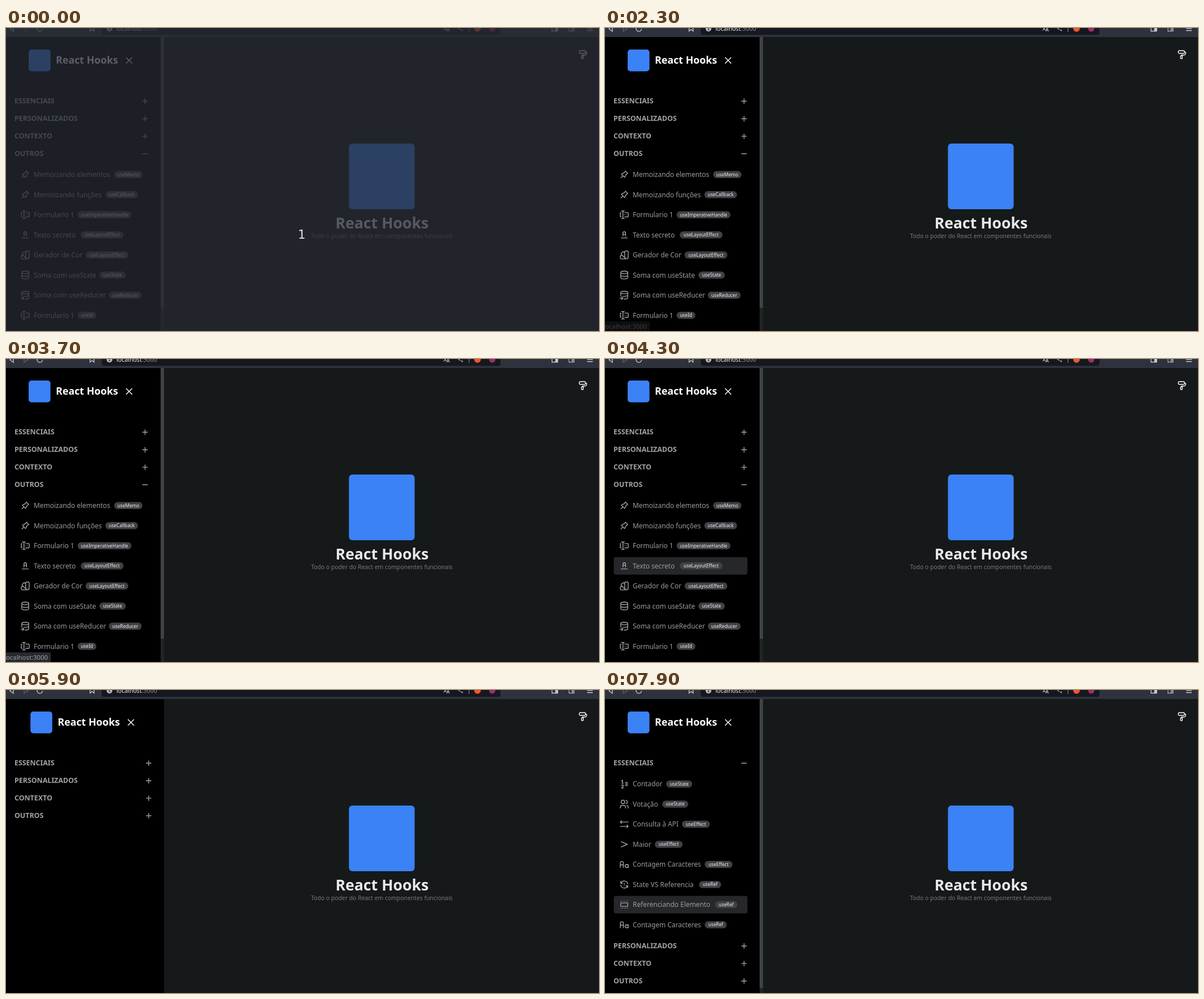
An HTML page that plays this animation: 1047 by 535 pixels, repeating every 8 s.

```html
<!DOCTYPE html>
<html lang="pt">
<head>
<meta charset="utf-8">
<title>React Hooks</title>
<style>
html, body { margin: 0; width: 100%; height: 100%; overflow: hidden; background: #151919; }
svg { display: block; width: 100%; height: 100%; }
text { font-family: "Noto Sans", "Open Sans", sans-serif; white-space: pre; }
.title { font-weight: 700; font-size: 17.8px; fill: #fff; }
.section { font-weight: 700; font-size: 12.4px; fill: #a1a3a6; }
.label { font-size: 11.9px; fill: #9a9da0; }
.tag { font-size: 8.25px; fill: #f2f2f2; text-anchor: middle; }
.icon { fill: none; stroke: #a1a3a6; stroke-width: 1.8; stroke-linecap: round; stroke-linejoin: round; }
.white { stroke: #fff; }
.bar { fill: none; stroke: #c9ccd3; stroke-width: 1.3; }
</style>
</head>
<body>
<svg viewBox="0 0 1047 535">
  <rect width="1047" height="535" fill="#151919"/>
  <rect width="279" height="535"/>

  <g id="browser">
    <rect width="1047" height="16" fill="#2e323d"/>
    <rect x="169" y="-10" width="704" height="22" rx="4" fill="#16181f"/>
    <g class="bar">
      <path d="M13 -4L7 1.5L13 6Z"/>
      <path d="M32 -4L39 1.5L32 6Z" stroke="#5c606a"/>
      <path d="M64.500 1.500A4.800 4.800 0 1 1 62 -3"/>
      <path d="M148.500 -6V5.500L152 2.500L155.500 5.500V-6"/>
      <path d="M773 -2H780M776.500 -2Q776 2 772.500 4M774 -1Q775 2 778 3.500M778 6L780.500 0L783 6M779 4H782" stroke="#a5a8b0"/>
      <path d="M805 -3L799 1L805 4" stroke="#8d9099"/>
      <path d="M817.500 -2V7" stroke="#8d9099" stroke-width="1"/>
      <path d="M964 -4H974V5.500H964Z"/>
      <path d="M970.500 -3H973.500V5H970.500Z" fill="#c9ccd3"/>
      <path d="M994 -4V5.500H1003V-1H994M1003 1H999.500V3.500H1003" stroke="#a5a8b0"/>
      <path d="M1026 0.500H1036M1026 4.500H1036"/>
    </g>
    <circle cx="182.700" cy="1.200" r="5" fill="#b4b7be"/>
    <path d="M182.700 0.500V4" stroke="#16181f" stroke-width="1.400"/>
    <circle cx="805.500" cy="4" r="1.500" fill="#8d9099"/>
    <circle cx="832.500" cy="1" r="5.800" fill="#f0562b"/>
    <circle cx="858.500" cy="1" r="5.500" fill="#a02c6c"/>
    <text x="195" y="4.800" font-size="10.600" fill="#f0f0f2">localhost<tspan fill="#8b8e96">:3000</tspan></text>
  </g>

  <g id="main">
    <rect x="605.500" y="204" width="116" height="116" rx="6" fill="#3b82f6"/>
    <text x="664" y="354" font-size="26.600" font-weight="700" fill="#e8eaea" text-anchor="middle">React Hooks</text>
    <text x="663.500" y="371" font-size="10.370" fill="#75797a" text-anchor="middle">Todo o poder do React em componentes funcionais</text>
  </g>

  <rect id="hover" x="15.500" width="236" height="31" rx="4" fill="#26272a"/>
  <g id="menus"></g>

  <g id="status">
    <path d="M0 518H76Q79 518 79 521V535H0Z" fill="#292c30"/>
    <text x="74" y="530.500" font-size="11.350" fill="#a9abae" text-anchor="end">localhost:3000</text>
  </g>

  <g id="count">
    <rect width="1047" height="535" fill="#262a32" opacity=".75"/>
    <text x="515.600" y="371.500" font-size="21" fill="#e6e6e6" style="font-family:'DejaVu Sans',sans-serif">1</text>
  </g>
</svg>
<script>
const LOOP = 8000, ROW = 35.5, SECTION = 30.9, TOP = 129, SCALE = 0.772;
const dots = y => [4, 8, 12, 16, 20].map(x => `M${x} ${y}h.01`).join('');

// icon outlines on a 24 unit grid
const ICONS = {
  close: 'M18.500 5.500l-13 13M5.500 5.500l13 13',
  plus: 'M12 6.500v11M6.500 12h11',
  minus: 'M6.500 12h11',
  paint: 'M7 3h10a2 2 0 0 1 2 2v2a2 2 0 0 1-2 2h-10a2 2 0 0 1-2-2v-2a2 2 0 0 1 2-2zM19 6h1a2 2 0 0 1 2 2a5 5 0 0 1-5 5h-5v2M11 15h2a1 1 0 0 1 1 1v4a1 1 0 0 1-1 1h-2a1 1 0 0 1-1-1v-4a1 1 0 0 1 1-1z',
  pin: 'M15 4.500l-4 4l-4 1.500l-1.500 1.500l7 7l1.500-1.500l1.500-4l4-4M9 15l-4.500 4.500M14.500 4l5.500 5.500',
  form: 'M12 3a3 3 0 0 0-3 3v12a3 3 0 0 0 3 3M6 3a3 3 0 0 1 3 3v12a3 3 0 0 1-3 3M13 7h7a1 1 0 0 1 1 1v8a1 1 0 0 1-1 1h-7M5 7h-1a1 1 0 0 0-1 1v8a1 1 0 0 0 1 1h1M17 12h.01M13 12h.01',
  text: 'M9 15v-7a3 3 0 0 1 6 0v7M9 11h6M5 19h14',
  swatch: 'M19 3h-4a2 2 0 0 0-2 2v12a4 4 0 0 0 8 0v-12a2 2 0 0 0-2-2M13 7.350l-2-2a2 2 0 0 0-2.800 0l-2.800 2.800a2 2 0 0 0 0 2.800l9 9M7.300 13h-2.300a2 2 0 0 0-2 2v4a2 2 0 0 0 2 2h12M17 17v.01',
  data: 'M4 6a8 3 0 1 0 16 0a8 3 0 1 0-16 0v6a8 3 0 0 0 16 0v-6M4 12v6a8 3 0 0 0 16 0v-6',
  load: 'M4 6a8 3 0 1 0 16 0a8 3 0 1 0-16 0v8m5 .800a11 3 0 0 0 11-2.800v-6M11.300 21q8.700 0 8.700-3v-6M2 19h7m-3-3l3 3l-3 3',
  digits: 'M8 10v-7l-2 2M6 16a2 2 0 1 1 4 0q0 1-1 2l-3 3h4M15 14a2 2 0 1 0 2-2a2 2 0 1 0-2-2M6.500 10h3',
  users: 'M5 7a4 4 0 1 0 8 0a4 4 0 1 0-8 0M3 21v-2a4 4 0 0 1 4-4h4a4 4 0 0 1 4 4v2M16 3.100a4 4 0 0 1 0 7.800M21 21v-2a4 4 0 0 0-3-3.850',
  arrows: 'M21 7h-18m3-3l-3 3l3 3M3 17h18m-3 3l3-3l-3-3',
  greater: 'M5 18l14-6l-14-6',
  letters: 'M3 19v-10.500a3.500 3.500 0 0 1 7 0v10.500M3 13h7M14 15.500a3.500 3.500 0 1 0 7 0a3.500 3.500 0 1 0-7 0M21 12v7',
  refresh: 'M20 11a8.100 8.100 0 0 0-15.500-2m-.500-4v4h4M4 13a8.100 8.100 0 0 0 15.500 2m.500 4v-4h-4M12 9v3M12 15h.01',
  box: 'M5 8h14a1 1 0 0 1 1 1v6a1 1 0 0 1-1 1h-14a1 1 0 0 1-1-1v-6a1 1 0 0 1 1-1z' + dots(4) + dots(20)
};

const SECTIONS = ['ESSENCIAIS', 'PERSONALIZADOS', 'CONTEXTO', 'OUTROS'];

// icon, label, tag, tag left edge, tag width
const ITEMS = {
  ESSENCIAIS: [
    ['digits', 'Contador', 'useState', 108, 46],
    ['users', 'Votação', 'useState', 101, 46],
    ['arrows', 'Consulta à API', 'useEffect', 136, 49],
    ['greater', 'Maior', 'useEffect', 88, 49],
    ['letters', 'Contagem Caracteres', 'useEffect', 176, 49],
    ['refresh', 'State VS Referencia', 'useRef', 166, 39],
    ['box', 'Referenciando Elemento', 'useRef', 194.5, 39],
    ['letters', 'Contagem Caracteres', 'useRef', 176, 39]
  ],
  OUTROS: [
    ['pin', 'Memoizando elementos', 'useMemo', 191, 50],
    ['pin', 'Memoizando funções', 'useCallback', 175.5, 57.5],
    ['form', 'Formulario 1', 'useImperativeHandle', 126.5, 95],
    ['text', 'Texto secreto', 'useLayoutEffect', 132, 75.5],
    ['swatch', 'Gerador de Cor', 'useLayoutEffect', 140.5, 75.5],
    ['data', 'Soma com useState', 'useState', 165, 46.5],
    ['load', 'Soma com useReducer', 'useReducer', 181.5, 58],
    ['form', 'Formulario 1', 'useId', 126.5, 33]
  ]
};

const icon = (name, x, y, cls = '') =>
  `<path class="icon ${cls}" d="${ICONS[name]}" transform="translate(${x} ${y}) scale(${SCALE}) translate(-12 -12)"/>`;

const item = ([name, label, tag, x, w], y) => icon(name, 34, y) +
  `<text class="label" x="49" y="${y + 4.3}">${label}</text>
   <rect x="${x}" y="${y - 6.3}" width="${w}" height="12.6" rx="6.3" fill="#3f4145"/>
   <text class="tag" x="${x + w / 2}" y="${y + 2.9}">${tag}</text>`;

function menu(open, thumbEnd) {
  const shift = open ? 0 : 3.2;
  let y = TOP;
  let out = `<rect x="${40 + shift}" y="38" width="38.5" height="38.5" rx="5" fill="#3b82f6"/>
    <text class="title" x="${88 + shift}" y="63.3">React Hooks</text>` + icon('close', 217.4 + shift, 57.2, 'white');
  for (const name of SECTIONS) {
    out += `<text class="section" x="15" y="${y + 4.4}">${name}</text>` +
      icon(name === open ? 'minus' : 'plus', 245.5 + shift * 2, y + 0.3);
    if (name === open) {
      ITEMS[name].forEach((row, i) => out += item(row, y + 37 + i * ROW));
      y += 7.8 + ITEMS[name].length * ROW;
    }
    y += SECTION;
  }
  if (open) out += `<rect x="273" y="16" width="6" height="519" fill="#222325"/>
    <rect x="273" y="16" width="6" height="${thumbEnd - 16}" fill="#414245"/>`;
  return `<g>${out}</g>`;
}

const $ = id => document.getElementById(id);
$('menus').innerHTML = menu('OUTROS', 494) + menu('', 0) + menu('ESSENCIAIS', 526);
$('main').innerHTML += icon('paint', 1017.7, 47, 'white');
const menus = [...$('menus').children];

// [start ms, value]
const MENU = [[0, 0], [5900, 1], [7100, 2]];
const STATUS = [[0, 0], [2300, .35], [2400, 1], [3000, .75], [3100, .3], [3200, 0], [3700, .95], [3800, .4], [3900, 0]];
const HOVER = [[0, -1], [4100, 0], [4200, 2], [4300, 3], [4500, 0], [4600, -1], [7800, 0], [7900, 6]];
const COUNT = [[0, 1], [100, 0]];
const at = (steps, t) => steps.filter(s => s[0] <= t).pop()[1];

function draw(t) {
  const open = at(MENU, t), row = at(HOVER, t);
  menus.forEach((m, i) => m.style.display = i === open ? '' : 'none');
  const first = TOP + 37 + (open === 0 ? 3 * SECTION : 0);
  $('hover').setAttribute('y', first + row * ROW - 15.5);
  $('hover').style.opacity = row < 0 ? 0 : 1;
  $('status').style.opacity = at(STATUS, t);
  $('count').style.opacity = at(COUNT, t);
}

const start = performance.now();
function tick() {
  draw((performance.now() - start) % LOOP);
  requestAnimationFrame(tick);
}
tick();
</script>
</body>
</html>
```
